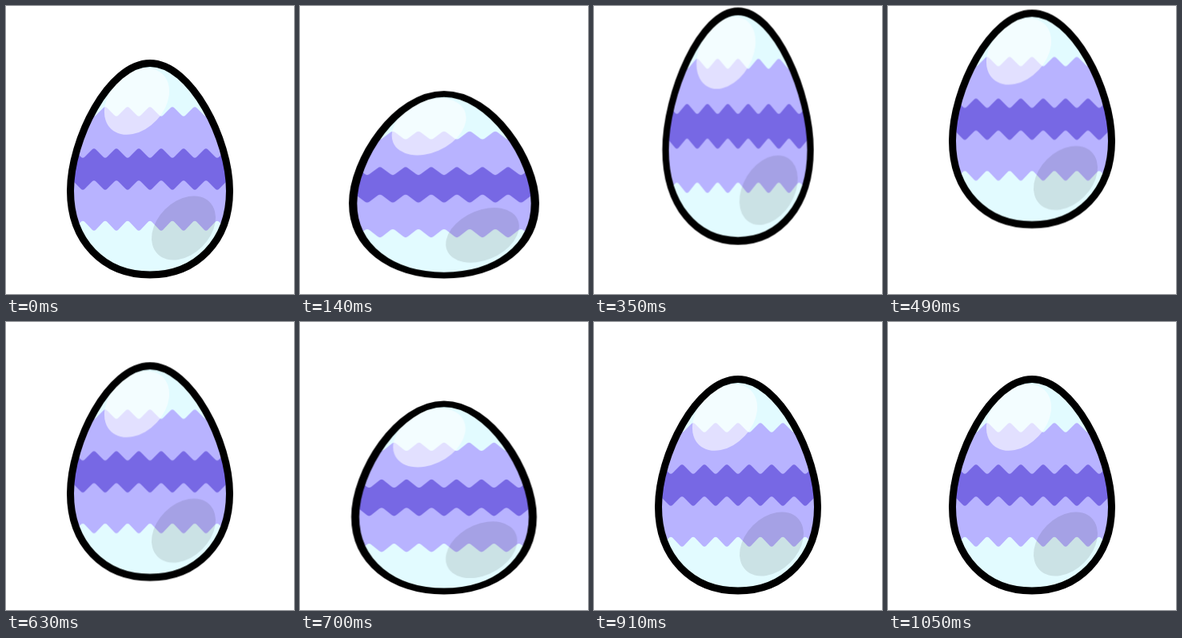
These frames come from a looping animation (360x360 px, 1120 ms). An HTML page:

```html
<!DOCTYPE html>
<html lang="en">
<head>
<meta charset="utf-8">
<title>Jumping egg</title>
<style>
  html, body { margin: 0; width: 100%; height: 100%; overflow: hidden; background: #fff; }
  svg { display: block; width: 100vw; height: 100vh; }
  #egg {
    transform-origin: 180px 340.5px;
    animation: jump 1120ms step-end infinite;
  }
  /* sixteen held poses, 70 ms each; the last ones rest */
  @keyframes jump {
    0%     { transform: translateY(0) scale(1, 1); }
    6.25%  { transform: translateY(0) scale(1.072, .928); }
    12.5%  { transform: translateY(0) scale(1.144, .857); }
    18.75% { transform: translateY(0) scale(.98, 1.017); }
    25%    { transform: translateY(0) scale(.817, 1.176); }
    31.25% { transform: translateY(-42px) scale(.91, 1.085); }
    37.5%  { transform: translateY(-67px) scale(1, 1); }
    43.75% { transform: translateY(-62.5px) scale(1, 1); }
    50%    { transform: translateY(-45px) scale(1, 1); }
    56.25% { transform: translateY(-16.7px) scale(1, 1); }
    62.5%  { transform: translateY(0) scale(1.115, .885); }
    68.75% { transform: translateY(0) scale(1.057, .943); }
    75%, 100% { transform: translateY(0) scale(1, 1); }
  }
</style>
</head>
<body>
<svg viewBox="0 0 360 360">
  <defs>
    <path id="shell" d="M180 71.5C231.5 71.5 279.5 167 279.5 231C279.5 294 238 336 180 336C122 336 80.5 294 80.5 231C80.5 167 128.5 71.5 180 71.5Z"/>
    <clipPath id="inside"><use href="#shell"/></clipPath>
  </defs>
  <g id="egg">
    <g clip-path="url(#inside)">
      <use href="#shell" fill="#e2fbff"/>
      <path id="wide" fill="#b8b3ff"/>
      <path id="narrow" fill="#7768e4"/>
      <ellipse rx="47" ry="34" transform="translate(163.5 119.4) rotate(-47)" fill="#fff" fill-opacity=".6"/>
      <ellipse rx="46" ry="33" transform="translate(222 277.5) rotate(-45)" fill="#000" fill-opacity=".1"/>
    </g>
    <use href="#shell" fill="none" stroke="#000" stroke-width="9"/>
  </g>
</svg>
<script>
  const STEP = 14, SOFT = 0.18;

  // Zigzag corners from left to right; phase 0 puts an upper corner at x = 180.
  function zigzag(high, low, phase) {
    const points = [];
    for (let i = -9; i <= 9; i++) {
      points.push([180 + i * STEP, (i + phase) % 2 ? low : high]);
    }
    return points;
  }

  const mix = (a, b, k) => [a[0] + (b[0] - a[0]) * k, a[1] + (b[1] - a[1]) * k];

  // Closed outline with slightly rounded corners.
  function outline(points) {
    const n = points.length;
    return points.map((p, i) => {
      const from = mix(p, points[(i + n - 1) % n], SOFT);
      const to = mix(p, points[(i + 1) % n], SOFT);
      return `${i ? 'L' : 'M'}${from}Q${p} ${to}`;
    }).join('') + 'Z';
  }

  function band(id, top, bottom) {
    document.getElementById(id).setAttribute('d', outline([...top, ...bottom.reverse()]));
  }

  band('wide', zigzag(125, 139, 0), zigzag(267.5, 282, 0));
  band('narrow', zigzag(177, 191, 1), zigzag(217, 231, 1));
</script>
</body>
</html>
```
